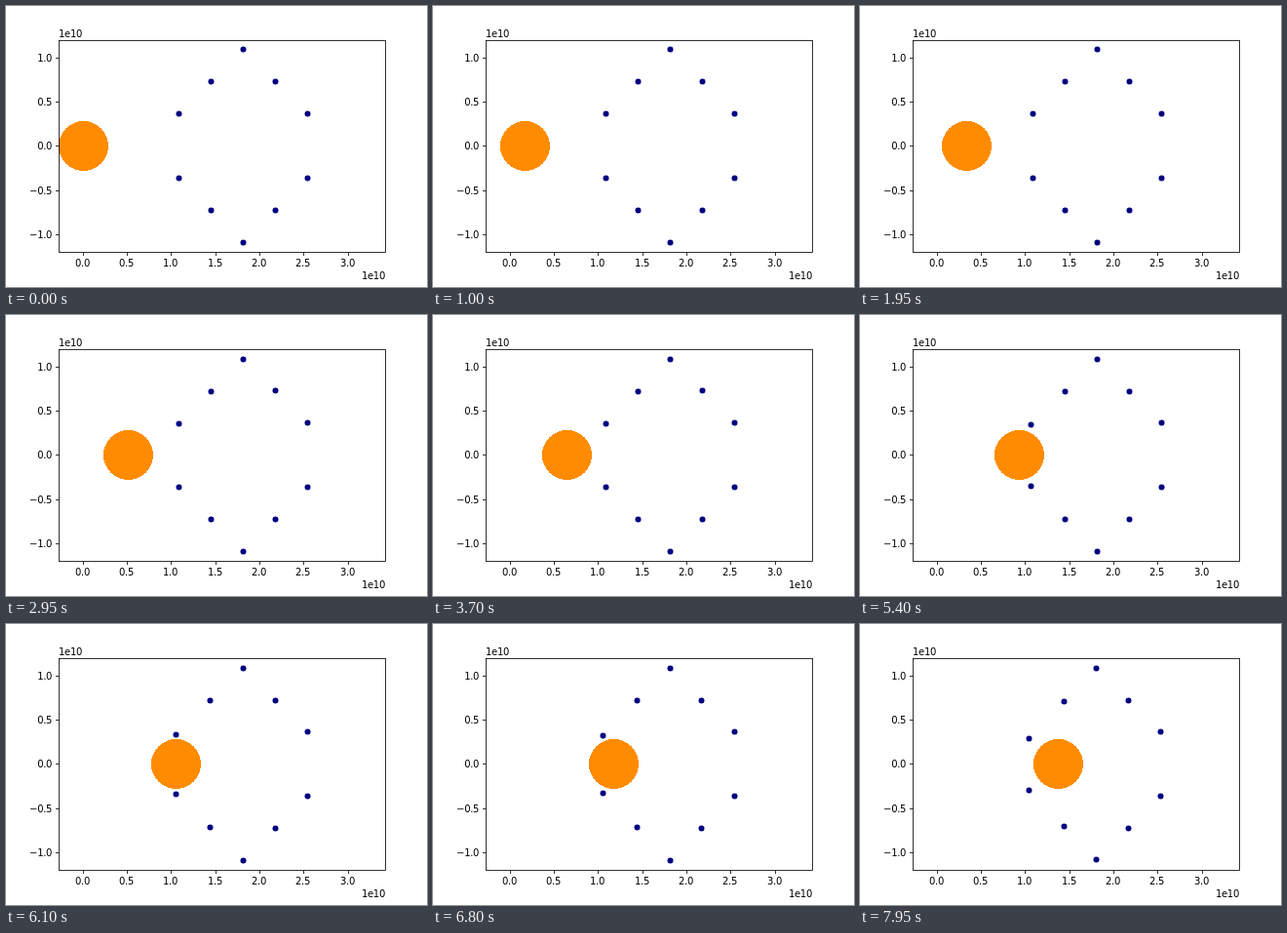
Write an HTML page that moves like this. It is 432 px wide and 288 px high and loops after 8 s.

```html
<!DOCTYPE html>
<html lang="en">
<head>
<meta charset="utf-8">
<title>Star passing a ring of bodies</title>
<style>
  html, body { margin: 0; width: 100%; height: 100%; overflow: hidden; background: #fff; }
  svg { display: block; width: 432px; height: 288px; }
  text { font: 10px "DejaVu Sans", sans-serif; letter-spacing: -.3px; fill: #000; }
  .axis { fill: none; stroke: #000; stroke-width: .8; }
  .x { text-anchor: middle; }
  .end { text-anchor: end; }
</style>
</head>
<body>
<svg viewBox="0 0 432 288">
  <circle id="star" r="25.5" fill="#ff8c00" shape-rendering="crispEdges"/>
  <g id="dots" fill="#000080"></g>
  <rect class="axis" x="54.5" y="35.5" width="335" height="217"/>
  <g id="ticks"></g>
  <text x="54" y="32">1e10</text>
  <text class="end" x="389" y="280">1e10</text>
</svg>
<script>
const STEPS = 160, DT = .05;                 // seconds per step
const ORIGIN = { x: 78.75, y: 143.28 }, UNIT = 45.3;
const RING = { x: 243.2, y: 143.26 }, GAP = 32.93;
const STAR = { x: 78.56, y: RING.y, speed: 15.68 };
const PULL = 860;                            // px^3 / s^2

const star = document.getElementById('star');
const dotLayer = document.getElementById('dots');
const tickLayer = document.getElementById('ticks');

function add(parent, tag, attrs, text) {
  const el = document.createElementNS('http://www.w3.org/2000/svg', tag);
  for (const key in attrs) el.setAttribute(key, attrs[key]);
  if (text) el.textContent = text;
  parent.appendChild(el);
  return el;
}

const label = n => (n / 2).toFixed(1).replace('-', '\u2212');

for (let i = 0; i <= 6; i++) {
  const x = Math.round(ORIGIN.x + UNIT * i);
  add(tickLayer, 'path', { class: 'axis', d: `M${x + .5} 252.5v3.5` });
  add(tickLayer, 'text', { class: 'x', x: x - .5, y: 267 }, label(i));
}
for (let i = -2; i <= 2; i++) {
  const y = Math.round(ORIGIN.y - UNIT * i);
  add(tickLayer, 'path', { class: 'axis', d: `M54.5 ${y + .5}h-3.5` });
  add(tickLayer, 'text', { class: 'end', x: 47.2, y: y + 4 }, label(i));
}

const starX = step => STAR.x + STAR.speed * DT * step;

// Path of one body falling toward the moving star, one point per step.
function fall(x, y) {
  const path = [];
  let vx = 0, vy = 0;
  for (let step = 0; step < STEPS; step++) {
    path.push({ x, y });
    const dx = starX(step) - x, dy = STAR.y - y;
    const k = PULL * DT / Math.hypot(dx, dy) ** 3;
    vx += dx * k;
    vy += dy * k;
    x += vx * DT;
    y += vy * DT;
  }
  return path;
}

// Diamond ring: a column offset of -2..2 gaps, mirrored above and below.
const dots = [];
for (let col = -2; col <= 2; col++) {
  for (const side of [-1, 1]) {
    const row = side * (3 - Math.abs(col));
    dots.push({
      el: add(dotLayer, 'circle', { r: 3 }),
      path: fall(RING.x + col * GAP, RING.y + row * GAP)
    });
  }
}

// Markers sit on whole pixels.
function place(el, x, y) {
  el.setAttribute('cx', Math.round(x) + .5);
  el.setAttribute('cy', Math.round(y) + .5);
}

function draw(seconds) {
  const step = Math.floor(seconds / DT) % STEPS;
  place(star, starX(step), STAR.y);
  for (const { el, path } of dots) place(el, path[step].x, path[step].y);
}

const start = performance.now();
function tick() {
  draw((performance.now() - start) / 1000);
  requestAnimationFrame(tick);
}
tick();
</script>
</body>
</html>
```
